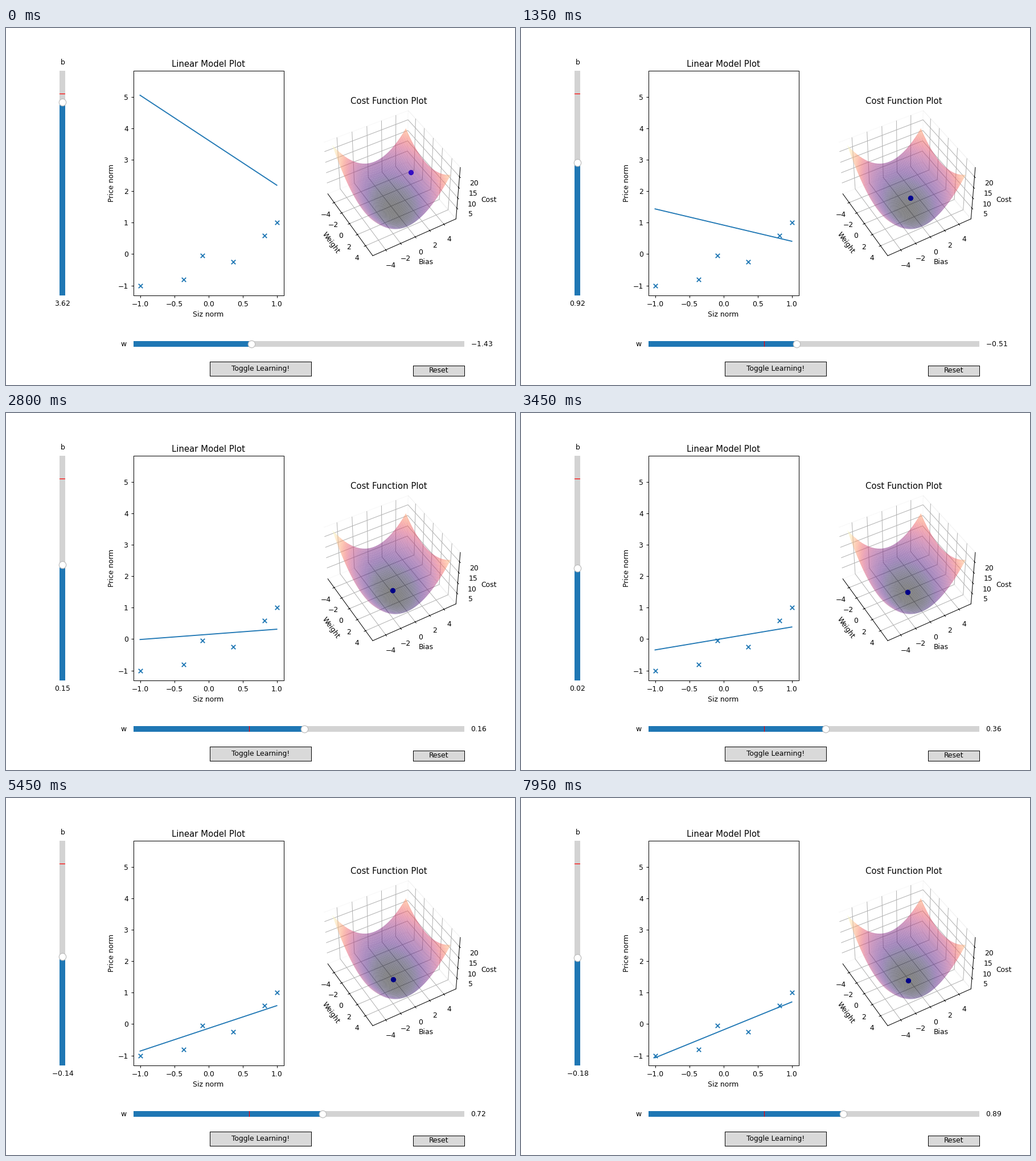
Animation, 894 px wide and 626 px high, one loop 8 s. Source, as a matplotlib script:

```python
import numpy as np
import matplotlib.pyplot as plt
from matplotlib.animation import FuncAnimation
from matplotlib.collections import PolyCollection
from matplotlib.lines import Line2D
from matplotlib.widgets import Button, Slider
from mpl_toolkits.mplot3d import proj3d

FRAMES, INTERVAL = 160, 50
RATE = 0.05
W0, B0 = -1.5, 4.0
LIMIT = 5

size = 2 * np.array([0, 7, 10, 15, 20, 22]) / 22 - 1
price = np.array([-1, -0.8, -0.045, -0.245, 0.58, 1])


def cost(w, b):
    err = np.multiply.outer(w, size) + np.asarray(b)[..., None] - price
    return (err ** 2).mean(axis=-1) / 2


def descend(steps):
    w, b = W0, B0
    path = [(w, b)]
    for _ in range(steps):
        err = w * size + b - price
        w, b = w - RATE * (err * size).mean(), b - RATE * err.mean()
        path.append((w, b))
    return path


# The first two steps happen before the animation starts
path = descend(FRAMES + 1)[2:]

fig = plt.figure(figsize=(10, 7.00224), dpi=89.4, facecolor="white")
fig.subplots_adjust(left=0.25, bottom=0.25)

# Linear model
ax = fig.add_subplot(1, 2, 1)
ax.scatter(size, price, marker="x")
ends = np.array([-1, 1])
line, = ax.plot(ends, W0 * ends + B0, color="C0")
ax.set(title="Linear Model Plot", xlabel="Siz norm", ylabel="Price norm",
       xlim=(-1.1, 1.1), ylim=(-1.325, 5.825))

# Cost surface
ax3 = fig.add_subplot(1, 2, 2, projection="3d")
ax3.view_init(elev=45, azim=-30)
axis = np.linspace(-LIMIT, LIMIT, 50)
W, B = np.meshgrid(axis, axis)
J = cost(W, B)
pad = np.ptp(J) / 48
reach = LIMIT * 1.1 * 25 / 24
ax3.set(title="Cost Function Plot", xlabel="Weight", ylabel="Bias",
        zlabel="Cost", xlim=(-reach, reach), ylim=(-reach, reach),
        zlim=(J.min() - pad, J.max() + pad))
ax3.set_xticks(range(-4, 5, 2))
ax3.set_yticks(range(-4, 5, 2))
ax3.set_zticks(range(5, 21, 5))
for a in (ax3.xaxis, ax3.yaxis, ax3.zaxis):
    a.pane.set_fill(False)
view = ax3.get_proj()


def project(w, b, z):
    return proj3d.proj_transform(np.ravel(w), np.ravel(b), np.ravel(z), view)


def corners(grid):
    g = np.reshape(grid, J.shape)
    quads = (g[:-1, :-1], g[1:, :-1], g[1:, 1:], g[:-1, 1:])
    return np.stack([q.ravel() for q in quads], axis=1)


# The view is fixed, so the surface is projected and depth-sorted only once
px, py, depth = (corners(p) for p in project(W, B, J))
order = np.argsort(-depth.mean(axis=1))
level = corners(J).mean(axis=1)
level = (level - level.min()) / np.ptp(level)
surface = PolyCollection(np.stack([px, py], axis=2)[order],
                         facecolors=plt.cm.magma(level[order], alpha=0.5),
                         edgecolors="none", transform=ax3.transData, zorder=2)
dot = Line2D([], [], marker="o", ms=7.5, mew=0, color="blue", ls="none",
             transform=ax3.transData, zorder=1)
fig.add_artist(dot)
fig.add_artist(surface)

# Controls
w_slider = Slider(fig.add_axes([0.25, 0.1, 0.65, 0.03]), "w",
                  -LIMIT, LIMIT, valinit=W0)
b_slider = Slider(fig.add_axes([0.1, 0.25, 0.0225, 0.63]), "b",
                  -LIMIT, LIMIT, valinit=B0, orientation="vertical")
w_slider.drawon = b_slider.drawon = False
toggle = Button(fig.add_axes([0.4, 0.025, 0.2, 0.04]), "Toggle Learning!")
reset = Button(fig.add_axes([0.8, 0.025, 0.1, 0.03]), "Reset")


def update(i):
    w, b = path[i]
    w_slider.set_val(w)
    b_slider.set_val(b)
    line.set_ydata(w * ends + b)
    x, y, _ = project(w, b, cost(w, b))
    dot.set_data(x, y)
    return line, dot


anim = FuncAnimation(fig, update, frames=FRAMES, interval=INTERVAL,
                     init_func=lambda: update(0), repeat=True)
plt.show()
```
